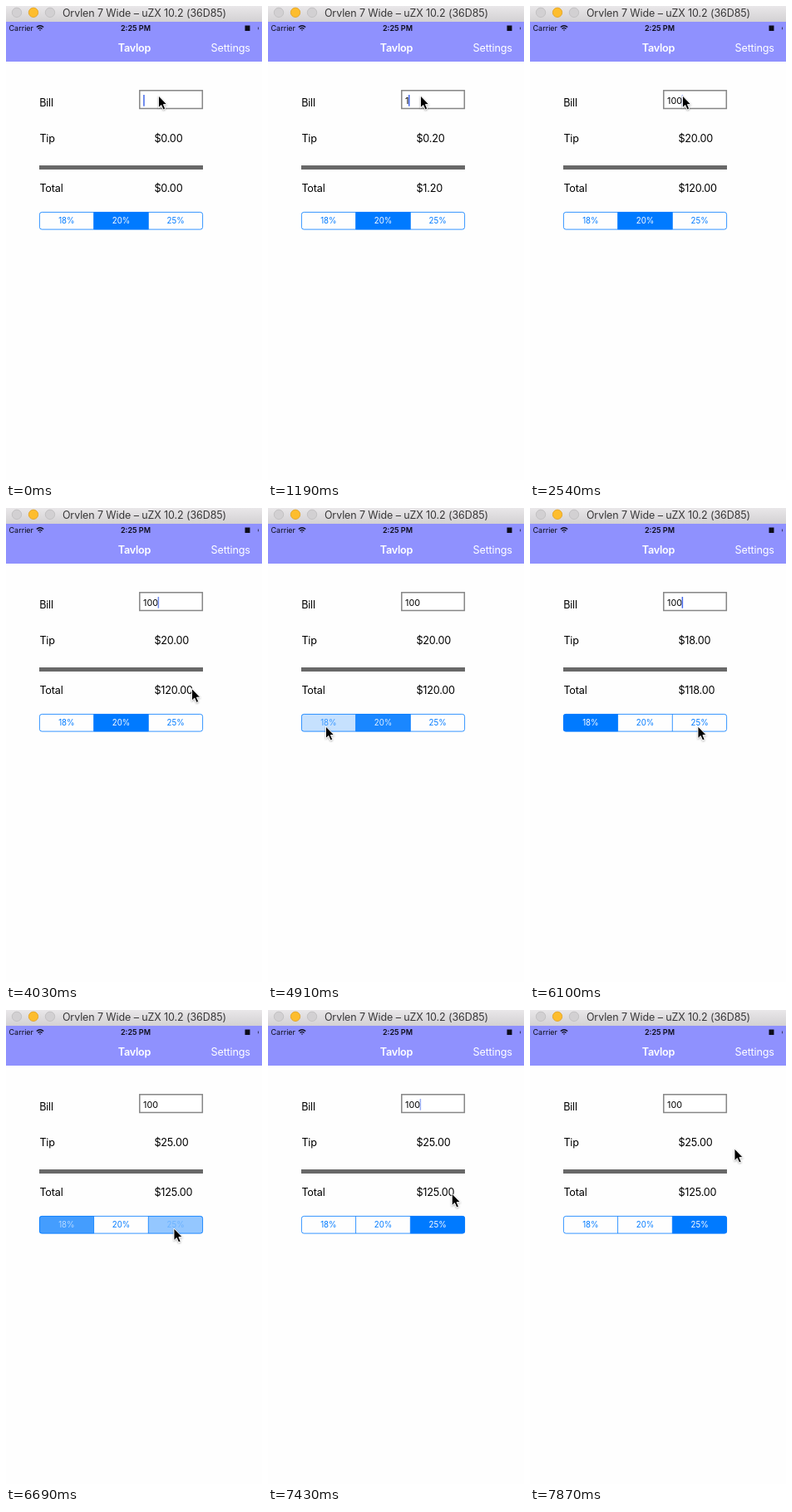
These frames come from a looping animation (308 by 571 pixels, 8 s). An HTML page:

```html
<!DOCTYPE html>
<html lang="en">
<head>
<meta charset="utf-8">
<title>Tip calculator</title>
<style>
  html, body { margin: 0; width: 100%; height: 100%; overflow: hidden; background: #fefefe; }
  svg { display: block; width: 308px; height: 571px; font-family: Inter, Roboto, sans-serif; }
  .body { font-size: 12.65px; letter-spacing: -.2px; }
  .status { font-size: 9px; }
  .field { font-size: 10.8px; }
  .seg { font-size: 9.7px; text-anchor: middle; }
  .mid { text-anchor: middle; }
  .bold { font-weight: 600; }
</style>
</head>
<body>
<svg viewBox="0 0 308 571">
  <defs>
    <linearGradient id="chrome" x2="0" y2="1">
      <stop offset="0" stop-color="#e9e7e9"/>
      <stop offset="1" stop-color="#d3d1d3"/>
    </linearGradient>
    <clipPath id="pill"><rect x="40" y="248" width="197" height="21.5" rx="3"/></clipPath>
    <filter id="shadow" x="-50%" y="-50%" width="200%" height="200%">
      <feDropShadow dx="0" dy="1" stdDeviation="1" flood-opacity=".35"/>
    </filter>
  </defs>

  <rect width="308" height="571" fill="#fefefe"/>

  <!-- window bar -->
  <rect width="308" height="19" fill="url(#chrome)"/>
  <g stroke-width=".8">
    <circle cx="13" cy="7.8" r="5.7" fill="#d2d0d2" stroke="#bdbbbd"/>
    <circle cx="33" cy="7.8" r="5.7" fill="#fdbd2e" stroke="#dfa023"/>
    <circle cx="53" cy="7.8" r="5.7" fill="#d2d0d2" stroke="#bdbbbd"/>
  </g>
  <text class="mid" x="166.5" y="12.8" font-size="12.5" letter-spacing="-.1" fill="#383738">Orvlen 7 Wide – uZX 10.2 (36D85)</text>

  <!-- status and navigation -->
  <rect y="19" width="308" height="48" fill="#8f91fe"/>
  <g class="status" fill="#0c0c18">
    <text x="3.5" y="30.2">Carrier</text>
    <text class="mid bold" x="156" y="30.2">2:25 PM</text>
    <rect x="287.5" y="23.5" width="6" height="6.5"/>
    <path d="M303 24.8q1.6 2 0 4.2z"/>
  </g>
  <g fill="none" stroke="#0c0c18" stroke-width="1.3">
    <path d="M36.8 25.6Q41 21.9 45.2 25.6"/>
    <path d="M38.5 27.5Q41 25.3 43.5 27.5"/>
    <path d="M39.8 28.6h2.4l-1.2 1.4z" fill="#0c0c18" stroke="none"/>
  </g>
  <g class="body" fill="#fff">
    <text class="mid bold" x="154.5" y="55.3">Tavlop</text>
    <text x="246.6" y="55.3">Settings</text>
  </g>

  <!-- form -->
  <g class="body">
    <text x="40.2" y="120.9">Bill</text>
    <text x="40.4" y="164.4">Tip</text>
    <text x="40.4" y="223.9">Total</text>
    <text id="tip" x="178.4" y="164.4"></text>
    <text id="total" x="178.4" y="223.9"></text>
  </g>
  <rect x="160.8" y="101.8" width="75.5" height="21.7" fill="#fff" stroke="#858585" stroke-width="1.5"/>
  <text id="bill" class="field" x="165" y="117.8"></text>
  <rect id="caret" y="107" width="1.5" height="13.7" fill="#4468e8"/>
  <rect x="40" y="192" width="197" height="5" fill="#686868"/>

  <!-- segments -->
  <g id="segs" clip-path="url(#pill)"></g>
  <g fill="none" stroke="#007aff" stroke-width=".8">
    <rect x="40.4" y="248.4" width="196.2" height="20.7" rx="2.8"/>
    <path d="M105.6 248.5v20.5M171.3 248.5v20.5"/>
  </g>
  <g id="labels" class="seg"></g>

  <path id="cursor" d="M0 0V14.6L3.3 11.5L5.7 16.9L8.2 15.8L5.9 10.6H10.2Z" stroke="#fff" stroke-width=".9" filter="url(#shadow)"/>
</svg>

<script>
const LOOP = 8000;
const STEP = 148.4;          // the screen refreshes once per step; times below are in steps
const BLINK = 6.62;
const RATES = [18, 20, 25];
const FIRST = 1;             // segment selected at the start

const keys = [8, 12, 13];
const taps = [{ at: 32.45, seg: 0 }, { at: 43.95, seg: 2 }];
const home = { x: 183.5, y: 108 };
const moves = [
  { from: 19, to: 25, x: 223.5, y: 217.5 },
  { from: 27, to: 31, x: 69.5, y: 263 },
  { from: 36, to: 41, x: 202, y: 263 },
  { from: 49, to: 53, x: 246, y: 167 }
];

const $ = id => document.getElementById(id);
const clamp = v => Math.min(1, Math.max(0, v));
const mix = (a, b, u) => a + (b - a) * u;
const money = n => '$' + n.toFixed(2);

function add(parent, tag, attrs, text = '') {
  const el = document.createElementNS('http://www.w3.org/2000/svg', tag);
  for (const key in attrs) el.setAttribute(key, attrs[key]);
  el.textContent = text;
  return $(parent).appendChild(el);
}

const segs = RATES.map((rate, i) => ({
  box: add('segs', 'rect', { x: 40 + i * 65.65, y: 248, width: 65.7, height: 21.5, fill: '#007aff' }),
  label: add('labels', 'text', { x: 72.9 + i * 65.65, y: 262.3 }, rate + '%')
}));

// Solid right after a key press, then a soft blink.
function caretLevel(since) {
  const p = since % BLINK;
  return since < 3 ? 1 : clamp(Math.min((p - .3) / .6, (5 - p) / 2));
}

function pointerAt(n) {
  let { x, y } = home;
  for (const move of moves) {
    const u = clamp((n - move.from) / (move.to - move.from));
    const eased = u * (2 - u);
    x = mix(x, move.x, eased);
    y = mix(y, move.y, eased);
  }
  return [x, y];
}

// Each tap crossfades the selection; the amounts follow early in the fade.
function selectionAt(n) {
  const levels = RATES.map((_, i) => +(i === FIRST));
  let chosen = FIRST;
  for (const tap of taps) {
    const u = clamp((n - tap.at) / 2.5);
    levels.forEach((level, i) => {
      levels[i] = i === tap.seg ? u : level * (1 - u ** 1.5);
    });
    if (u > .3) chosen = tap.seg;
  }
  return { levels, rate: RATES[chosen] };
}

function draw(now) {
  const n = Math.floor(now % LOOP / STEP);
  const pressed = keys.filter(key => key <= n);
  const bill = '100'.slice(0, pressed.length);
  const { levels, rate } = selectionAt(n);
  const tip = bill * rate / 100;

  $('bill').textContent = bill;
  $('tip').textContent = money(tip);
  $('total').textContent = money(+bill + tip);
  $('caret').setAttribute('x', 165.2 + (bill && $('bill').getComputedTextLength() - .6));
  $('caret').setAttribute('opacity', caretLevel(n - (pressed.at(-1) ?? 0)));
  $('cursor').setAttribute('transform', `translate(${pointerAt(n)})`);
  levels.forEach((level, i) => {
    segs[i].box.setAttribute('opacity', level);
    segs[i].label.setAttribute('fill', `rgb(${255 * level}, ${122 + 133 * level}, 255)`);
  });
}

const start = performance.now();
function tick() {
  draw(performance.now() - start);
  requestAnimationFrame(tick);
}
tick();
</script>
</body>
</html>
```
